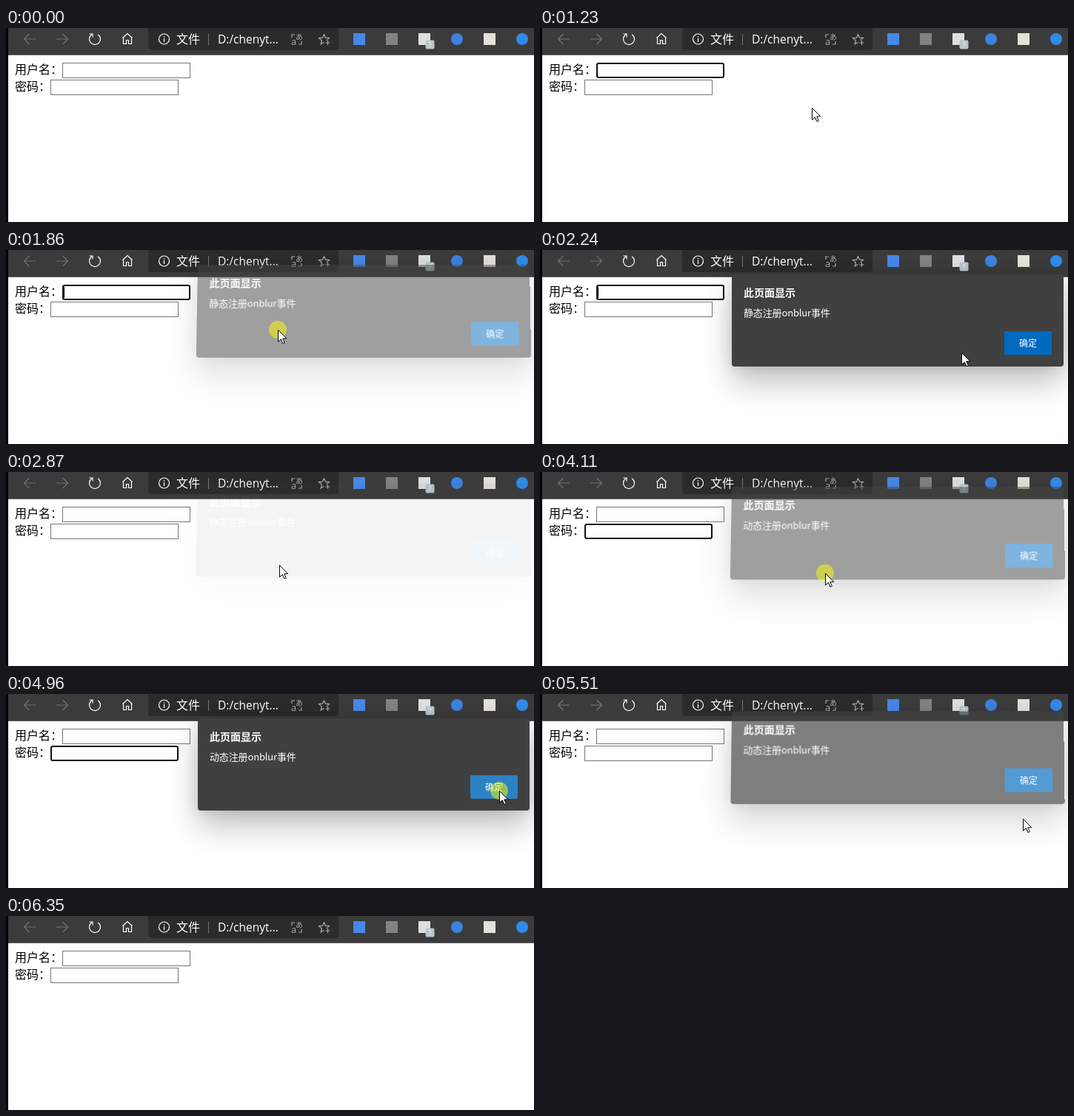
An HTML page that plays this animation: 713 px wide and 263 px high, repeating every 6.43 s.

```html
<!DOCTYPE html>
<html lang="zh-CN">
<head>
<meta charset="utf-8">
<style>
html, body { margin: 0; width: 100%; height: 100%; overflow: hidden; background: #fff; }
body, svg text { font-family: "Noto Sans CJK SC", "Noto Sans CJK", sans-serif; }
svg { position: absolute; left: 0; top: 0; }
svg text.latin { font-family: "Open Sans", "Noto Sans", sans-serif; }
.line { fill: none; stroke: #fff; stroke-width: 1.2; }
.dim { stroke: #727272; }
.soft { stroke: #aaa; }
.field { fill: #fff; stroke: #767676; }
.field.focus { stroke: #101010; stroke-width: 2; }
#dialog {
  position: absolute; left: 259px; top: 33px; width: 448px; height: 125px;
  background: #404040; color: #fff; border-radius: 4px; transform-origin: 50% 0;
  box-shadow: 0 22px 42px rgba(0,0,0,.24), 0 0 20px rgba(0,0,0,.12);
}
#dialog div { position: absolute; left: 16px; line-height: 20px; white-space: nowrap; }
#dialog .title { top: 14px; font-size: 14px; font-weight: bold; }
#message { top: 42px; font-size: 13px; letter-spacing: -.15px; }
#dialog #ok {
  left: 368px; top: 77px; width: 64px; height: 32px; border-radius: 2px;
  font-size: 12px; line-height: 32px; text-align: center;
}
</style>
</head>
<body>
<svg width="713" height="263">
  <rect width="713" height="36" fill="#3b3b3b"/>
  <rect y="36" width="713" height="1" fill="#666"/>
  <path d="M192 0h257v26a4 4 0 0 1-4 4H196a4 4 0 0 1-4-4z" fill="#2b2b2b"/>
  <rect width="3" height="263"/>

  <path class="line dim" d="M40 15H24.5m7-7-7 7 7 7M68 15h15.5m-7-7 7 7-7 7"/>
  <path class="line" d="M116 8.700A7.5 7.5 0 1 0 124 8.700M112.500 8h4.500v4.500"/>
  <path class="line" d="M157.500 13.500 164 7.500l6.500 6M158.500 12.500v9h4v-5h3v5h4v-9"/>
  <circle class="line" cx="213.500" cy="15" r="7"/>
  <path class="line" d="M213.500 14v5M213.500 11v1.500"/>
  <path d="M273.500 8v15" stroke="#777"/>
  <path class="line soft" d="M429.500 8.500l2 4.700 5 .4-3.800 3.300M429.500 8.500l-2 4.700-5 .4 3.900 3.400-1.200 5 4.300-2.700M434.500 17v6m-3-3h6"/>
  <g fill="#aaa">
    <text class="latin" x="385" y="23" font-size="13">a</text>
    <text x="391" y="16" font-size="10">あ</text>
    <path class="line soft" d="M390 9h-4v4M395 22h4v-4"/>
  </g>
  <g fill="#fff">
    <text x="230" y="21" font-size="16">文件</text>
    <text class="latin" x="286" y="21" font-size="15.5">D:/chenyt...</text>
  </g>

  <rect x="469" y="7" width="16" height="16" fill="#4688e8"/>
  <rect x="513" y="7" width="16" height="16" fill="#80837f"/>
  <rect x="557" y="7" width="16" height="16" fill="#dedede"/>
  <rect x="566.500" y="16.500" width="12" height="12" rx="2" fill="#b9c6ca"/>
  <text class="latin" x="572.500" y="26" font-size="9" fill="#fff" text-anchor="middle">?</text>
  <circle cx="609" cy="15" r="8" fill="#3c82e0"/>
  <rect x="645" y="7" width="16" height="16" fill="#e4e0da"/>
  <circle cx="697" cy="15" r="8" fill="#2f8bea"/>

  <g font-size="16">
    <text x="12" y="62">用户名：</text>
    <text x="12" y="85">密码：</text>
  </g>
  <rect class="field" id="user"/>
  <rect class="field" id="pass"/>
  <path id="caret" d="M2.500 3v15" stroke="#000"/>
</svg>

<div id="dialog">
  <div class="title">此页面显示</div>
  <div id="message"></div>
  <div id="ok">确定</div>
</div>

<svg width="713" height="263">
  <g id="mouse">
    <circle id="click" r="12" fill="#ff0" fill-opacity=".5"/>
    <path id="arrow" d="M.5 .5v16l3.800-3.600 2.600 5.800 2.400-1-2.600-5.700h5.100z" fill="#fff" stroke="#000"/>
    <path id="beam" d="M-3 -7.500h2.500l.5.500.5-.5H3M0-7V7M-3 7.500h2.500L0 7l.5.500H3" fill="none" stroke="#000"/>
  </g>
</svg>

<script>
const $ = id => document.getElementById(id);
const LOOP = 6430, TICK = 77.5;   // the screen refreshes once per tick; all times below are ticks
const BLINK = 7, OPEN = 3, CLOSE = 5, CLICK = 2;

const visits = [
  { id: 'user', x: 76, y: 47, how: '静态', focus: 8, leave: 23, press: 32, close: 33 },
  { id: 'pass', x: 60, y: 70, how: '动态', focus: 43, leave: 52, press: 64, close: 70 }
];
const stops = [
  { arrive: 1, depart: 1, x: 452, y: 248 },
  { arrive: 8, depart: 11, x: 203, y: 53 },
  { arrive: 16, depart: 24, x: 367, y: 108 },
  { arrive: 31, depart: 33, x: 650, y: 126 },
  { arrive: 39, depart: 40, x: 229, y: 97 },
  { arrive: 42, depart: 46, x: 204, y: 78 },
  { arrive: 51, depart: 54, x: 385, y: 137 },
  { arrive: 62, depart: 70, x: 666, y: 131 },
  { arrive: 74, depart: 74, x: 610, y: 260 }
];

const clamp = p => Math.min(1, Math.max(0, p));
const remaining = p => (1 - clamp(p)) ** 1.75;
const within = (k, start, length) => k >= start && k < start + length;
const inside = (p, x, y, w, h) => p.x >= x && p.x < x + w && p.y >= y && p.y < y + h;
const show = (id, on) => $(id).style.display = on ? '' : 'none';

// Straight moves between stops that sag a little on the way.
function pointer(k) {
  const i = Math.max(1, stops.findIndex(s => k < s.arrive));
  const a = stops[i - 1], b = stops[i];
  const p = clamp((k - a.depart) / (b.arrive - a.depart));
  const dx = b.x - a.x, sag = Math.min(22, Math.abs(dx) / 8);
  return {
    x: Math.round(a.x + dx * p),
    y: Math.round(a.y + (b.y - a.y) * p + sag * 4 * p * (1 - p))
  };
}

function drawField({ id, x, y }, focus) {
  const inset = focus ? 1 : .5;
  const box = { x: x + inset, y: y + inset, width: 173 - 2 * inset, height: 21 - 2 * inset, rx: focus ? 2 : 0 };
  for (const name in box) $(id).setAttribute(name, box[name]);
  $(id).classList.toggle('focus', focus);
}

function drawDialog(visit, k, mouse, pressed) {
  const opacity = k < visit.close
    ? 1 - remaining((k - visit.leave) / OPEN)
    : remaining((k - visit.close) / CLOSE);
  const tilt = 1 - opacity ** 2, style = $('dialog').style;
  style.opacity = opacity;
  style.transform = tilt
    ? `translateY(${-17.4 * tilt}px) perspective(1000px) rotateX(${6 * tilt}deg)`
    : 'none';
  $('message').textContent = visit.how + '注册onblur事件';
  const hover = inside(mouse, 627, 110, 64, 32);
  $('ok').style.background = pressed ? '#2b82c5' : hover ? '#1a76c3' : '#006abf';
}

function draw(now) {
  const k = Math.floor((now % LOOP + 16) / TICK);
  const visit = visits.find(v => k < v.close + CLOSE) || visits[1];
  const { focus, leave, press, close } = visit;
  const mouse = pointer(k), focused = within(k, focus, close - focus);
  const pressed = within(k, press, close - press);

  for (const v of visits) drawField(v, v === visit && focused);
  // The open dialog freezes the caret.
  show('caret', focused && Math.floor((Math.min(k, leave) - focus) / BLINK) % 2 === 0);
  $('caret').setAttribute('transform', `translate(${visit.x} ${visit.y})`);
  drawDialog(visit, k, mouse, pressed);

  const typing = visits.some(v => inside(mouse, v.x, v.y, 173, 21));
  show('mouse', within(k, stops[0].arrive, stops[stops.length - 1].arrive - 1));
  $('mouse').setAttribute('transform', `translate(${mouse.x} ${mouse.y})`);
  show('click', pressed || within(k, focus, CLICK) || within(k, leave, CLICK));
  show('arrow', !typing);
  show('beam', typing);
}

const start = performance.now();
function loop() {
  draw(performance.now() - start);
  requestAnimationFrame(loop);
}
loop();
</script>
</body>
</html>
```
